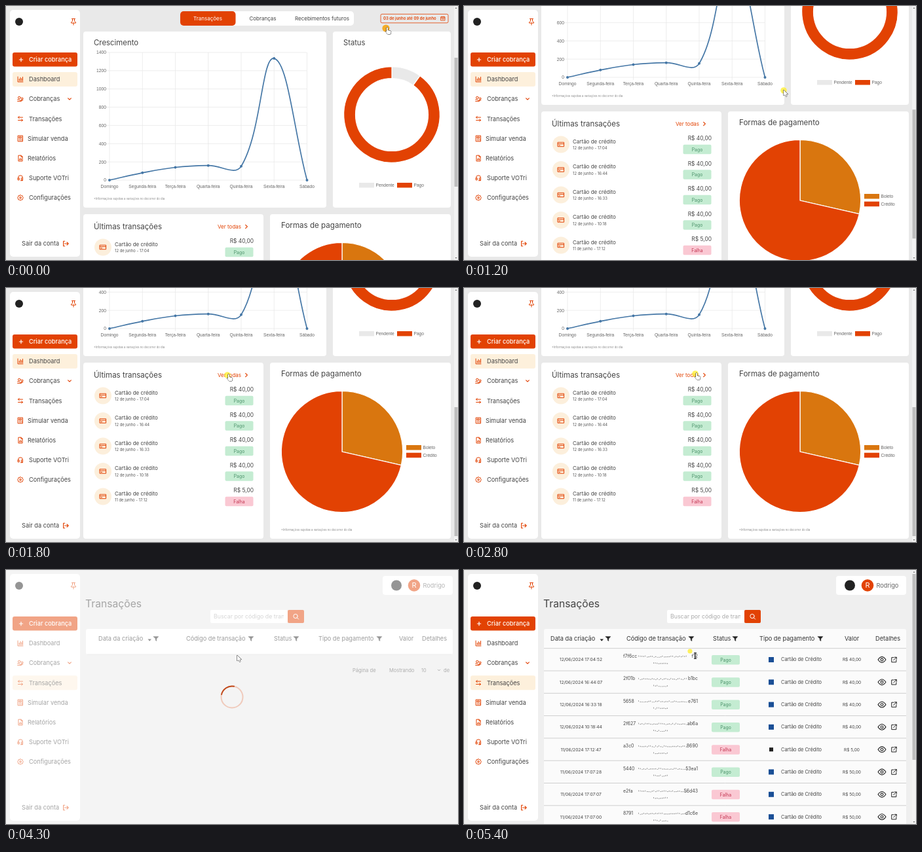
An HTML page with a canvas that plays this animation: 690 px wide and 388 px high, repeating every 6300 ms.

```html
<!DOCTYPE html>
<html lang="pt">
<head>
<meta charset="utf-8">
<title>Painel de transações</title>
<style>
html, body { margin: 0; width: 100%; height: 100%; overflow: hidden; background: #e9e9e9; }
canvas { display: block; width: 690px; height: 388px; }
</style>
</head>
<body>
<canvas id="stage"></canvas>
<script>
const W = 690, H = 388, LOOP = 6300, STEP = 100;
const ORANGE = '#e24203', AMBER = '#d9760f', CREAM = '#fdf0dc', INK = '#444';
const SANS = 'Inter, sans-serif', LABEL = '"Liberation Sans", Arial, sans-serif';
const canvas = document.getElementById('stage');
const c = canvas.getContext('2d');
const dpr = window.devicePixelRatio || 1;
canvas.width = W * dpr;
canvas.height = H * dpr;

function box(x, y, w, h, color, r = 0) {
  c.fillStyle = color;
  c.beginPath();
  c.roundRect(x, y, w, h, r);
  c.fill();
}
function disc(x, y, r, color) {
  c.fillStyle = color;
  c.beginPath();
  c.arc(x, y, r, 0, 7);
  c.fill();
}
function text(s, x, y, size, color = INK, align = 'left', weight = 400, font = SANS) {
  c.font = `${weight} ${size}px ${font}`;
  c.textAlign = align;
  c.fillStyle = color;
  c.fillText(s, x, y);
}
function line(x1, y1, x2, y2, color, width = 1) {
  c.strokeStyle = color;
  c.lineWidth = width;
  c.beginPath();
  c.moveTo(x1, y1);
  c.lineTo(x2, y2);
  c.stroke();
}

// Icons are drawn on a 24 unit grid around their centre.
const ICONS = {
  pin: 'M7 3h10M9 3v7l-4 4v2h14v-2l-4-4V3M12 16v6',
  bars: 'M3 3v18h18M8 11v6M12 6v11M16 9v8M20 4v13',
  coins: 'M12 7a4 4 0 1 1-8 0a4 4 0 1 1 8 0M21 10a3 3 0 1 1-6 0a3 3 0 1 1 6 0M2 14h5l4 3h4M2 20h12l7-5-2-2-5 3',
  swap: 'M8 3L4 7l4 4M4 7h16M16 13l4 4-4 4M20 17H4',
  calc: 'M4 2h16v20H4zM8 6h8v4H8zM8 14h1M12 14h1M16 14h1M8 18h1M12 18h1M16 18h1',
  file: 'M14 2H5v20h14V7zM14 2v5h5M9 18v-3M12 18v-6M15 18v-4',
  support: 'M4 15v-4a8 8 0 0 1 16 0v4M4 12h4v7H4zM16 12h4v7h-4zM20 19v2h-7',
  gear: 'M12 2l3 3 4 0 1 4 2 3-2 3-1 4-4 0-3 3-3-3-4 0-1-4-2-3 2-3 1-4 4 0zM15 12a3 3 0 1 1-6 0a3 3 0 1 1 6 0',
  exit: 'M9 3H4v18h5M9 12h13M17 7l5 5-5 5',
  down: 'M4 8l8 8 8-8',
  right: 'M8 4l8 8-8 8',
  card: 'M2 5h20v14H2zM2 10h20M5 15h4',
  calendar: 'M3 5h18v16H3zM3 10h18M8 2v5M16 2v5M8 15h8',
  search: 'M18 11a7 7 0 1 1-14 0a7 7 0 1 1 14 0M16 16l5 5',
  eye: 'M1 12q11-16 22 0q-11 16-22 0zM15.5 12a3.5 3.5 0 1 1-7 0a3.5 3.5 0 1 1 7 0',
  open: 'M11 4H3v17h17v-8M14 3h7v7M21 3L10 14',
  plus: 'M12 3v18M3 12h18',
  filter: 'M2 3h20l-8 9v9l-4-3v-6z'
};
for (const k in ICONS) ICONS[k] = new Path2D(ICONS[k]);

function icon(name, x, y, size, color = ORANGE, width = 1, solid = false) {
  const k = size / 24;
  c.save();
  c.translate(x - size / 2, y - size / 2);
  c.scale(k, k);
  c.lineWidth = width / k;
  c.lineJoin = c.lineCap = 'round';
  c.strokeStyle = c.fillStyle = color;
  if (solid) c.fill(ICONS[name]);
  c.stroke(ICONS[name]);
  c.restore();
}

const MENU = [
  ['Dashboard', 'bars', 35], ['Cobranças', 'coins', 35], ['Transações', 'swap', 35],
  ['Simular venda', 'calc', 33], ['Relatórios', 'file', 33],
  ['Suporte VOTri', 'support', 35], ['Configurações', 'gear', 35]
];

function sidebar(active) {
  box(6, 6, 107, 377, '#fff', 5);
  disc(20, 24, 6, '#222');
  icon('pin', 103, 24, 12);
  box(10, 71, 99, 21.5, ORANGE, 3);
  icon('plus', 23, 82, 7, '#fff', 1.2);
  text('Criar cobrança', 35, 85, 9.2, '#fff', 'left', 500);
  MENU.forEach(([name, ic, x], i) => {
    const y = 112 + i * 30.15;
    if (i === active) box(10, y - 11, 99, 22, CREAM, 3);
    icon(ic, 22, y, 10.5);
    text(name, x, y + 3.2, 9.2);
  });
  icon('down', 97, 142, 7, ORANGE, 1.2);
  text('Sair da conta', 24, 366.3, 9.2);
  icon('exit', 91, 363, 10, ORANGE, 1.2);
}

function scrollbar(y, h) {
  box(684, 0, 6, H, '#f2f2f2');
  box(684.5, y, 5, h, '#bdbdbd');
  c.fillStyle = '#777';
  c.beginPath();
  c.moveTo(685.5, 4); c.lineTo(687, 2); c.lineTo(688.5, 4);
  c.moveTo(685.5, 384); c.lineTo(687, 386); c.lineTo(688.5, 384);
  c.fill();
}

function badge(paid, x, y) {
  box(x, y, 43, 14.5, paid ? '#c4ecd2' : '#fac8d3', 2);
  text(paid ? 'Pago' : 'Falha', x + 21.5, y + 9.7, 6.9, paid ? '#4a9169' : '#c23450', 'center');
}

const NOTE = '*Informações sujeitas a variações no decorrer do dia';
const DAYS = ['Domingo', 'Segunda-feira', 'Terça-feira', 'Quarta-feira', 'Quinta-feira', 'Sexta-feira', 'Sábado'];
const SALES = [0, 80, 140, 160, 152, 1335, 0];

function growth() {
  const left = 158, gap = 50.25, base = 266, unit = 195 / 1400;
  for (let v = 0; v <= 1400; v += 200) {
    const y = base - v * unit;
    line(153, y, 459, y, '#e9e9e9', 0.8);
    text(v, 153, y + 2.4, 6.7, '#666', 'right', 400, LABEL);
  }
  const pts = SALES.map((v, i) => [left + i * gap, base - v * unit]);
  pts.forEach(([x], i) => {
    line(x, 71, x, 270, '#e9e9e9', 0.8);
    text(DAYS[i], x, 278, 6.7, '#666', 'center', 400, LABEL);
  });
  // Spline handles follow the neighbours, weighted by distance.
  const dist = (a, b) => Math.hypot(a[0] - b[0], a[1] - b[1]);
  const handles = pts.map((p, i) => {
    const a = pts[i - 1] || p, b = pts[i + 1] || p;
    const d1 = dist(a, p), d2 = dist(p, b);
    const move = f => [p[0] + f * (b[0] - a[0]), Math.min(base, Math.max(71, p[1] + f * (b[1] - a[1])))];
    return [move(-0.4 * d1 / (d1 + d2)), move(0.4 * d2 / (d1 + d2))];
  });
  c.strokeStyle = '#4577a6';
  c.lineWidth = 1.7;
  c.beginPath();
  c.moveTo(...pts[0]);
  for (let i = 1; i < pts.length; i++) c.bezierCurveTo(...handles[i - 1][1], ...handles[i][0], ...pts[i]);
  c.stroke();
  pts.forEach(p => disc(p[0], p[1], 2, '#4577a6'));
}

function slice(x, y, r, hole, from, to, color) {
  const turn = Math.PI * 2, a = (from - 0.25) * turn, b = (to - 0.25) * turn;
  c.beginPath();
  c.arc(x, y, r, a, b);
  if (hole) c.arc(x, y, hole, b, a, true);
  else c.lineTo(x, y);
  c.closePath();
  c.fillStyle = color;
  c.fill();
  c.strokeStyle = '#fff';
  c.lineWidth = 1.2;
  c.stroke();
}
function legend(name, x, y, color) {
  box(x, y, 23, 7.5, color);
  text(name, x + 25.5, y + 6.2, 6.6, '#666', 'left', 400, LABEL);
}

const SALES_ROWS = ['12 de junho - 17:04', '12 de junho - 16:44', '12 de junho - 16:33', '12 de junho - 10:18', '11 de junho - 17:12'];

function dashboard(scroll) {
  c.save();
  c.translate(0, -scroll);
  box(266, 8, 265, 22, '#fff', 5);
  box(266, 8, 84.5, 22, ORANGE, 5);
  text('Transações', 308, 21.8, 8, '#fff', 'center');
  text('Cobranças', 392, 21.8, 8, INK, 'center');
  text('Recebimentos futuros', 482.5, 21.8, 8, INK, 'center');
  c.strokeStyle = ORANGE;
  c.lineWidth = 0.8;
  c.beginPath();
  c.roundRect(572, 12.4, 103, 13.4, 2);
  c.stroke();
  text('03 de junho até 09 de junho', 576, 21.2, 6, ORANGE, 'left', 600);
  icon('calendar', 667, 19, 8, ORANGE, 0.8);

  box(118, 39, 371, 269, '#fff', 4);
  text('Crescimento', 134, 60.3, 11.4);
  growth();
  text(NOTE, 134, 296, 4.3, '#888');

  box(499, 39, 180, 269, '#fff', 4);
  text('Status', 515, 60.3, 11.2);
  slice(589, 166, 73.3, 55.5, 0, 0.1, '#e9e9e9');
  slice(589, 166, 73.3, 55.5, 0.1, 1, ORANGE);
  legend('Pendente', 539, 270, '#e9e9e9');
  legend('Pago', 597, 270, ORANGE);

  box(118, 318, 275, 269, '#fff', 4);
  text('Últimas transações', 134, 341, 11.5);
  text('Ver todas', 323, 339.8, 8, ORANGE);
  icon('right', 367, 337, 8, ORANGE, 1.2);
  SALES_ROWS.forEach((when, i) => {
    const y = 368 + i * 38.5, paid = i < 4;
    disc(148, y + 0.5, 13, '#fcefdc');
    icon('card', 148, y + 0.5, 11);
    text('Cartão de crédito', 166, y - 1.3, 8);
    text(when, 166, y + 8.2, 5.9, '#555');
    text(paid ? 'R$ 40,00' : 'R$ 5,00', 378, y - 6, 8.4, INK, 'right');
    badge(paid, 334.5, y + 0.8);
  });

  box(403, 318, 276, 269, '#fff', 4);
  text('Formas de pagamento', 420, 339, 11.6);
  slice(513, 454, 92.7, 0, 0, 2 / 7, AMBER);
  slice(513, 454, 92.7, 0, 2 / 7, 1, ORANGE);
  legend('Boleto', 611, 444, AMBER);
  legend('Crédito', 611, 455.7, ORANGE);
  text(NOTE, 420, 575, 4.3, '#888');
  c.restore();
  scrollbar(79 + scroll * 0.505, 197);
}

const ORDERS = [
  ['12/06/2024 17:04:52', 'f7f6cc', 'f12'], ['12/06/2024 16:44:07', '2f01b', 'b1bc'],
  ['12/06/2024 16:33:18', '5658', 'e761'], ['12/06/2024 10:18:44', '2f627', 'ab6a'],
  ['11/06/2024 17:12:47', 'a3c0', '8690'], ['11/06/2024 17:07:28', '5440', '53ea1'],
  ['11/06/2024 17:07:07', 'e2fa', '56d43'], ['11/06/2024 17:07:00', '8791', 'd1c6e']
];
const FAILED = [4, 6, 7];

// Hidden middle of a code: only scraps of the letters remain.
function scraps(x1, x2, y, seed) {
  c.fillStyle = '#8a8a8a';
  for (let x = x1; x < x2; x += 2.6) {
    seed = (seed * 16807) % 2147483647;
    const r = seed / 2147483647;
    c.fillRect(x, y + r * 2.4, 0.8 + r, 0.7 + (1 - r) * 1.3);
  }
}

function order([date, head, tail], i) {
  const y = 137 + i * 34.3, mid = y + 2.4, paid = !FAILED.includes(i);
  text(date, 178.5, mid, 6.7, INK, 'center');
  text(head, 243, y - 3, 6.9);
  text(tail, 357, y - 3, 6.9, INK, 'right');
  scraps(266, 339, y - 6.5, 77 + i * 911);
  scraps(289, 311, y + 4, 5003 + i * 733);
  badge(paid, 378, y - 7);
  if (i === 4) box(466, y - 3, 6, 6, '#222');
  else box(465, y - 4, 8, 8, '#1a4f96');
  text('Cartão de Crédito', 484, mid, 7.4);
  text(i < 4 ? 'R$ 40,00' : i === 4 ? 'R$ 5,00' : 'R$ 50,00', 592, mid, 6.5, INK, 'center');
  icon('eye', 638, y, 13, '#222', 1.1);
  icon('open', 656.5, y, 10, '#222', 1);
  line(122, y + 17, 675, y + 17, '#cfcfcf', 1);
}

function transactions(loading) {
  const dx = loading ? 7 : 0, sx = loading ? 2 : 0;
  box(568 + dx, 9, 107, 29, '#fff', 4);
  disc(589 + dx, 23.5, 8, '#222');
  disc(616 + dx, 23.5, 9.3, ORANGE);
  text('R', 616 + dx, 27.4, 11, '#fff', 'center');
  text('Rodrigo', 629.5 + dx, 26.6, 9.2, '#666');
  text('Transações', 121, 56.5, 15.7);

  box(310 + sx, 61, 118, 20, '#fff', 2);
  c.save();
  c.beginPath();
  c.rect(310 + sx, 61, 112, 20);
  c.clip();
  text('Buscar por código de transação', 315 + sx, 74.2, 8.8, '#aaa');
  c.restore();
  box(428 + sx, 61, 25, 20, ORANGE, 2);
  icon('search', 440.5 + sx, 71, 11, '#fff', 1);

  box(122, 90, loading ? 560 : 553, loading ? 39 : H, loading ? '#fff' : '#fbfbfb', 3);
  const cols = loading ? [141, 275, 409, 477, 600, 635] : [132, 248, 380, 451, 581, 628];
  ['Data da criação', 'Código de transação', 'Status', 'Tipo de pagamento', 'Valor', 'Detalhes']
    .forEach((name, i) => text(name, cols[i], 108.2, 9.2, '#333'));
  [88, 99, 34, 93].forEach((w, i) => icon('filter', cols[i] + w, 105, 9, '#222', 0.6, true));
  c.fillStyle = '#222';
  c.beginPath();
  c.moveTo(cols[0] + 75.5, 105.5);
  c.lineTo(cols[0] + 81, 105.5);
  c.lineTo(cols[0] + 78.2, 108.7);
  c.fill();

  if (loading) {
    line(124, 129, 680, 129, '#d8d8d8');
    text('Página de', 529, 155.5, 7.6, '#555');
    text('Mostrando', 585, 155.5, 7.5, '#555');
    text('10', 634, 155.5, 7.3, '#555');
    icon('down', 661, 153, 5, '#555');
    text('de', 668, 155.5, 7.6, '#555');
  } else {
    line(122, 119.7, 675, 119.7, '#cfcfcf');
    ORDERS.forEach(order);
    scrollbar(6, 284);
  }
}

function spinner(t) {
  const a = Math.PI + (t - 4300) / 1000 * Math.PI * 2;
  c.lineWidth = 2;
  c.strokeStyle = '#f0cabb';
  c.beginPath();
  c.arc(345, 194, 16.5, 0, 7);
  c.stroke();
  c.strokeStyle = '#c04a1c';
  c.beginPath();
  c.arc(345, 194, 16.5, a + 0.2, a + 1.8);
  c.stroke();
}

const POINTERS = {
  arrow: new Path2D('M0 0V9L2.1 7.2L3.6 10.4L5 9.7L3.6 6.7H6.4Z'),
  hand: new Path2D('M0 0Q1-1 1.8 0V4L6 5Q7 5.3 6.7 7L6 10H1.5L-1.6 6.2Q-1.6 4.8 0 6Z'),
  beam: new Path2D('M-2-5H2V-3.8H.7V3.8H2V5H-2V3.8H-.7V-3.8H-2Z')
};
function pointer(kind, x, y) {
  c.save();
  c.translate(x, y);
  c.lineJoin = 'round';
  c.lineWidth = 1;
  c.fillStyle = kind === 'beam' ? '#333' : '#fff';
  c.strokeStyle = kind === 'beam' ? 'rgba(255,255,255,.6)' : '#222';
  c.stroke(POINTERS[kind]);
  c.fill(POINTERS[kind]);
  c.restore();
}

// Linear track through [time, ...values] keys.
function track(keys, t) {
  let i = 0;
  while (i < keys.length - 1 && keys[i + 1][0] <= t) i++;
  const a = keys[i], b = keys[i + 1] || a;
  const f = b === a ? 0 : Math.max(0, (t - a[0]) / (b[0] - a[0]));
  return a.slice(1).map((v, j) => v + (b[j + 1] - v) * f);
}
const SCROLL = [[900, 0], [1000, 4], [1200, 157], [1300, 190], [1400, 204]];
const PATH = [[0, 580, 34], [300, 488, 129], [1300, 488, 129], [1700, 338, 133], [2000, 338, 133],
  [2300, 353, 131], [4400, 353, 131], [4500, 345, 124]];

function cursor(t) {
  const [x, y] = track(PATH, t);
  const click = t < 100 || (t >= 3600 && t < 3900);
  const kind = t >= 4500 ? 'beam' : t < 100 || (t >= 1700 && t < 4000) ? 'hand' : 'arrow';
  if (t < 4000 || t >= 4500) {
    disc(x, y, click ? 5.6 : kind === 'beam' ? 3.6 : 4.8, click ? 'rgba(245,166,20,.9)' : 'rgba(255,238,40,.75)');
  }
  if (kind === 'beam') pointer(kind, x + 8, y + 7);
  else if (kind === 'hand') pointer(kind, x + 1, y - 1);
  else pointer(kind, x, y - 1);
}

function draw(t) {
  c.setTransform(dpr, 0, 0, dpr, 0, 0);
  const loading = t >= 4000 && t < 4500, done = t >= 4500;
  box(0, 0, W, H, done ? '#efefef' : '#e9e9e9');
  if (t < 4000) dashboard(track(SCROLL, t)[0]);
  else transactions(loading);
  sidebar(t < 4000 ? 0 : 2);
  if (loading) {
    box(0, 0, W, H, 'rgba(255,255,255,.52)');
    spinner(t);
  }
  if (t >= 3500 && t < 4100) {
    box(0, 380, 229, 8, '#111');
    text('https://cloud-stage.votri.com.br/pt/portal/transaction', 2, 385.6, 4, '#bbb');
  }
  cursor(t);
}

function frame() {
  const t = performance.now() % LOOP;
  draw(Math.floor(t / STEP) * STEP);
  requestAnimationFrame(frame);
}
frame();
</script>
</body>
</html>
```
